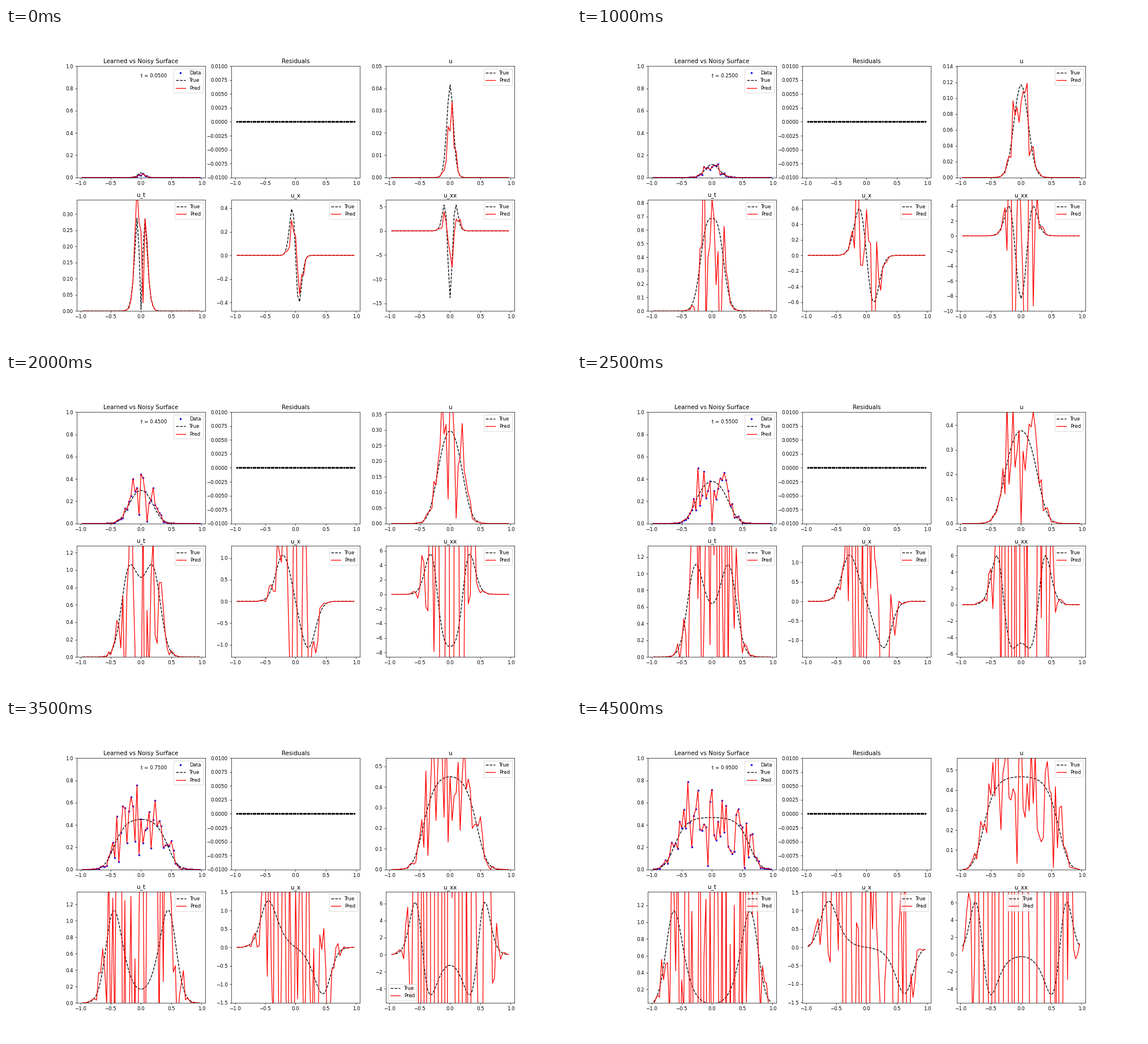
A matplotlib script that plays this animation: 998 by 561 pixels, repeating every 5 s.

```python
import numpy as np
import matplotlib.pyplot as plt
from matplotlib.animation import FuncAnimation

FRAMES, INTERVAL = 10, 500
H = 1 / 30                    # grid spacing
DT = 0.05                     # time between stored states
DIFF, RATE, CAP = 0.0228, 10.0, 0.47
NOISE = 0.42
x = np.linspace(-1, 1, 61)
xi = x[1:-1]


def second_diff(u):
    p = np.pad(u, 1, mode="edge")
    return (p[2:] - 2 * u + p[:-2]) / H**2


def double_grad(u):
    return np.gradient(np.gradient(u, H), H)


def solve(sub=500):
    """Fisher-KPP growth from a narrow bump, stored every DT."""
    u = 0.049 * np.exp(-x**2 / 0.00166)
    states = [u]
    for _ in range(2 * FRAMES):
        for _ in range(sub):
            u = u + DT / sub * (DIFF * second_diff(u) + RATE * u * (1 - u / CAP))
        states.append(u)
    return np.array(states)


def add_noise(clean):
    """Noise in proportion to the value, never below zero."""
    rng = np.random.default_rng(4)
    return np.maximum(clean * (1 + NOISE * rng.standard_normal(clean.shape)), 0)


def fields(states, k, xx):
    u = states[k]
    u_t = (states[k + 1] - states[k - 1]) / (2 * DT)
    return [f[1:-1] for f in (u, u_t, np.gradient(u, H), xx(u))]


true = solve()
pred = add_noise(true)

fig, axes = plt.subplots(2, 3, figsize=(16, 8.9941), dpi=62.375)
fig.subplots_adjust(left=0.125, right=0.9, bottom=0.11, top=0.88,
                    wspace=0.2, hspace=0.2)
ax_fit, ax_res, *ax_der = axes.flat
titles = ["Learned vs Noisy Surface", "Residuals", "u", "u_t", "u_x", "u_xx"]
for ax, title in zip(axes.flat, titles):
    ax.set_title(title)
    ax.set_xlim(1.1 * xi[0], 1.1 * xi[-1])


def line_pair(ax):
    black, = ax.plot(xi, 0 * xi, "k--", label="True")
    red, = ax.plot(xi, 0 * xi, "r-", label="Pred")
    return black, red


dots, = ax_fit.plot(xi, 0 * xi, "b.", label="Data")
fit_pair = line_pair(ax_fit)
ax_fit.set_ylim(0, 1)
ax_fit.legend(loc="upper right")
clock = ax_fit.text(0, 0.9, "")

ax_res.plot(xi, 0 * xi, "k.")
ax_res.set_ylim(-0.01, 0.01)

pairs = [line_pair(ax) for ax in ax_der]
legends = [ax.legend(loc="upper right") for ax in ax_der]


def fit_ylim(ax, y):
    """Scale to the data, snapping to a tick less than half a pixel away."""
    lo, hi = 1.2 * y.min(), 1.2 * y.max()
    tol = 0.0026 * (hi - lo)
    for tick in ax.yaxis.get_major_locator().tick_values(lo, hi):
        if abs(tick - lo) < tol:
            lo = tick
        if abs(tick - hi) < tol:
            hi = tick
    ax.set_ylim(lo, hi)


def update(i):
    k = 2 * i + 1
    clean = fields(true, k, second_diff)
    learned = fields(pred, k, double_grad)
    dots.set_ydata(learned[0])
    fit_pair[0].set_ydata(clean[0])
    fit_pair[1].set_ydata(learned[0])
    clock.set_text(f"t = {k * DT:.4f}")
    for ax, (black, red), c, p in zip(ax_der, pairs, clean, learned):
        black.set_ydata(c)
        red.set_ydata(p)
        fit_ylim(ax, c)
    # the last legend moves to where the dashed curve leaves room
    loc = "upper right" if i < 6 else "lower left" if i < 9 else "upper center"
    legends[-1].set_loc(loc)
    return []


anim = FuncAnimation(fig, update, frames=FRAMES, interval=INTERVAL,
                     init_func=lambda: update(0), repeat=True, repeat_delay=0)
plt.show()
```
